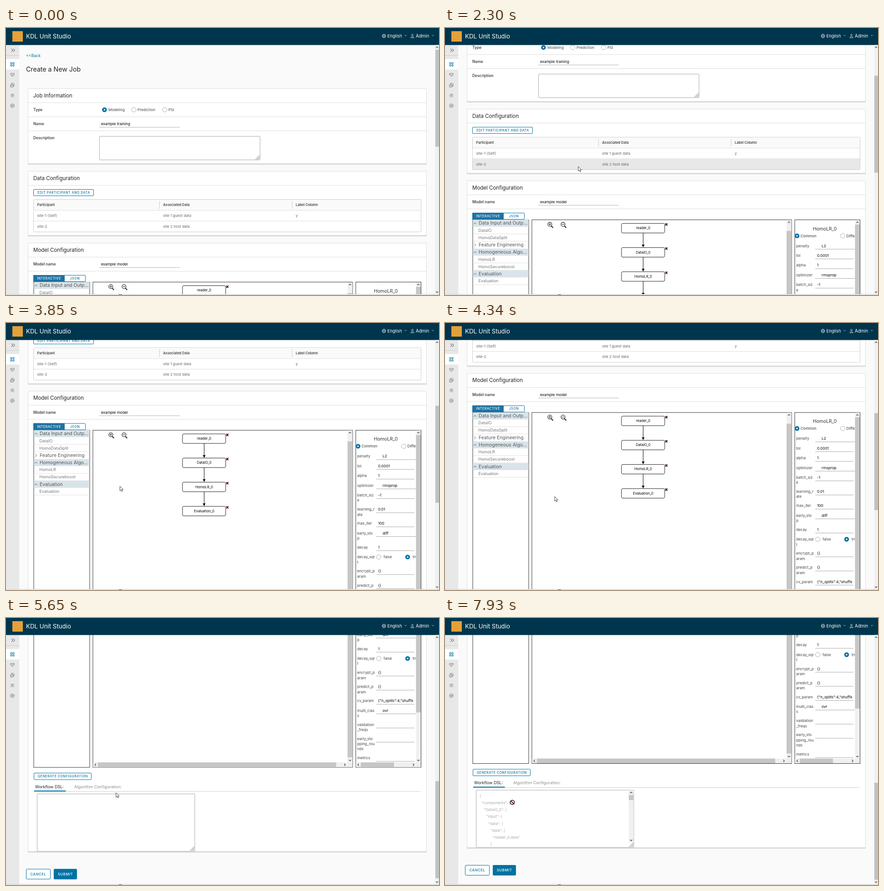
An HTML page for the animation above (8 s loop, 952 by 588 pixels).

```html
<!DOCTYPE html>
<html lang="en">
<head>
<meta charset="utf-8">
<title>Create a New Job</title>
<style>
  html, body { margin: 0; width: 100%; height: 100%; overflow: hidden; background: #fafafa; }
  svg { display: block; font-family: Inter, "Open Sans", sans-serif; }
  svg svg { overflow: hidden; }
</style>
</head>
<body>
<script>
const BLUE = '#0072a3', GREY = '#666', INK = '#222';

// Drawing helpers; y of a text is its visual middle
const rect = (x, y, w, h, fill, extra = '') =>
  `<rect x="${x}" y="${y}" width="${w}" height="${h}" fill="${fill}" ${extra}/>`;
const box = (x, y, w, h, fill, stroke, r = 0, extra = '') =>
  rect(x + .5, y + .5, w - 1, h - 1, fill, `stroke="${stroke}" rx="${r}" ${extra}`);
const path = (d, stroke, width = 1, extra = '') =>
  `<path d="${d}" fill="none" stroke="${stroke}" stroke-width="${width}" ${extra}/>`;
const hline = (x1, x2, y, color = '#dedede') => rect(x1, y, x2 - x1, 1, color);
const text = (s, x, y, size, fill = INK, extra = '') =>
  `<text x="${x}" y="${y + size * .36}" font-size="${size}" fill="${fill}" ${extra}>${s.replace(/</g, '&lt;')}</text>`;
const bold = (s, x, y, size = 8.4) => text(s, x, y, size, '#444', 'font-weight="600"');
const caps = (s, x, y, fill, size = 7) =>
  text(s, x, y, size, fill, 'font-weight="500" letter-spacing=".6" text-anchor="middle"');
const chevron = (x, y, turn, r = 2.5, color = '#444', width = 1.2) =>
  path(`M${-r} ${r / 2}L0 ${-r / 2}L${r} ${r / 2}`, color, width, `transform="translate(${x} ${y}) rotate(${turn})"`);
const radio = (x, y, on) => on
  ? `<circle cx="${x}" cy="${y}" r="5.2" fill="${BLUE}"/><circle cx="${x}" cy="${y}" r="1.7" fill="#fff"/>`
  : `<circle cx="${x}" cy="${y}" r="5" fill="#fff" stroke="#999" stroke-width=".8"/>`;
const grip = (x, y) => path(`M${x - 9} ${y}l9 -9M${x - 6} ${y}l6 -6M${x - 3} ${y}l3 -3`, '#666', .9);
const clip = (x, y, w, h, body) =>
  `<svg x="${x}" y="${y}" width="${w}" height="${h}" viewBox="${x} ${y} ${w} ${h}">${body}</svg>`;
const vbar = (x, y, w, h, from, to) => rect(x, y, w, h, '#f0f0f0') + rect(x, from, w, to - from, '#c6c6c6')
  + chevron(x + w / 2, y + 5, 0) + chevron(x + w / 2, y + h - 5, 180);
const hbar = (x, y, w, h, from, to, end) => rect(x, y, w, h, '#f0f0f0') + rect(from, y, to - from, h, '#c6c6c6')
  + chevron(x + 5, y + h / 2, -90) + chevron(end, y + h / 2, 90);
const card = (y, h, title, ...lines) => rect(48, y + 2, 877, h, '#d9d9d9', 'rx="2"')
  + box(48, y, 877, h, '#fff', '#ddd', 2) + text(title, 60, y + 15.5, 11.5)
  + lines.map(l => hline(49, 924, l)).join('');

function jobCard() {
  return text('<<Back', 44, 60.5, 8.8, BLUE) + text('Create a New Job', 44, 91, 14.2)
    + card(133, 166, 'Job Information', 164, 195, 226)
    + bold('Type', 60, 180) + bold('Name', 60, 211) + bold('Description', 60, 242)
    + radio(216.5, 180, true) + text('Modeling', 225, 180, 8.2, '#444')
    + radio(281, 180) + text('Prediction', 289, 180, 8.2, '#444')
    + radio(349, 180) + text('PSI', 357, 180, 8.2, '#444')
    + text('example training', 209, 211, 8.2, '#000') + hline(205, 382, 218, '#b3b3b3')
    + box(205, 238, 354, 53, '#fff', '#aaa', 1.5) + grip(557.5, 289.5);
}

function dataCard() {
  const rows = [['site-1 (Self)', 'site 1 guest data', 'y'], ['site-2', 'site 2 host data', '']];
  const cols = [68.5, 345.5, 637];
  return card(315, 142, 'Data Configuration', 346)
    + box(60, 355, 133, 15, '#fff', BLUE, 1.5) + caps('EDIT PARTICIPANT AND DATA', 127, 362.7, BLUE)
    + rect(60, 378, 853, 71.5, '#ccc', 'rx="2"') + box(60, 377, 853, 72, '#fff', '#ccc', 2)
    + rect(61, 378, 851, 23, '#fafafa')
    + ['Participant', 'Associated Data', 'Label Column'].map((s, i) => bold(s, cols[i], 389.7, 7.4)).join('')
    + rect(337, 381, 1, 17, '#ccc') + rect(628.5, 381, 1, 17, '#ccc')
    + rows.map((row, i) => rect(61, 402 + 23.5 * i, 851, 23, '#fff', `id="row${i}"`)
      + hline(61, 912, 401 + 23.5 * i, '#ddd')
      + row.map((s, c) => text(s, cols[c], 413.3 + 23.5 * i, 8.1, GREY)).join('')).join('');
}

function tree() {
  const rows = ['^Data Input and Outp...', 'DataIO', 'HomoDataSplit', '>Feature Engineering',
    '^Homogeneous Algo...', 'HomoLR', 'HomoSecureboost', '^Evaluation', 'Evaluation'];
  return box(60.5, 559, 124, 520, '#fff', '#333') + rows.map((s, i) => {
    const y = 566.7 + 15.95 * i, open = s[0] == '^';
    if (open || s[0] == '>')
      return (open ? rect(61.5, y - 7.5, 122, 15.5, '#d9e4ea') : '')
        + chevron(66, y + .5, open ? 0 : 90, 3, '#555', 1) + text(s.slice(1), 74, y, 10.4, '#565656');
    return text(s, 73.5, y, 9, '#777') + hline(61.5, 183.5, y + 7.5, '#e0e0e0');
  }).join('');
}

function graph() {
  const zoom = (x, sign) => `<circle cx="${x}" cy="569.5" r="4.4" fill="#fff" stroke="#333" stroke-width="1.3"/>`
    + path(`M${x + 3} 573l4 4`, '#333', 2.2) + path(sign, '#333', 1.2);
  return box(190.5, 559, 572, 520, '#fff', '#333')
    + zoom(230.5, 'M228 569.5h5M230.5 567v5') + zoom(259.5, 'M257 569.5h5')
    + ['reader_0', 'DataIO_0', 'HomoLR_0', 'Evaluation_0'].map((s, i) => {
      const y = 567 + 53.2 * i;
      return (i ? path(`M435.7 ${y - 32}v27`, '#000') + `<path d="M432.7 ${y - 6}h6l-3 6z"/>` : '')
        + box(387.5, y, 96, 22, '#fff', '#222', 3) + text(s, 435.7, y + 10.7, 7.6, '#000', 'text-anchor="middle"')
        + path(`M484.3 ${y + .3}l4.6 4.8m0 -4.8l-4.6 4.8`, '#4a0f0f', 1.9);
    }).join('')
    + vbar(751, 560, 10.5, 508, 584, 1056.5) + hbar(191.5, 1067.5, 559.5, 10.5, 202, 726, 745)
    + rect(751, 1067.5, 10.5, 10.5, '#eee');
}

function params() {
  // label lines | value; "*" marks a drop-down
  const rows = ['penalty|*L2', 'tol|0.0001', 'alpha|1', 'optimizer|*rmsprop', 'batch_siz/e|-1',
    'learning_r/ate|0.01', 'max_iter|100', 'early_sto/p|*diff', 'decay|1', 'decay_sqr/t|?',
    'encrypt_p/aram|{}', 'predict_p/aram|{}', 'cv_param|{"n_splits":4,"shuffle', 'multi_clas/s|*ovr',
    'validation/_freqs|', 'early_sto/pping_rou/nds|', 'metrics|'];
  let y = 616.7, body = text('HomoLR_0', 835, 579, 10.4, '#333', 'text-anchor="middle"')
    + radio(774, 594.7, true) + text('Common', 781.5, 594.7, 8.2, '#333')
    + radio(874.5, 594.7) + text('Different', 882.5, 594.7, 8.2, '#333');
  for (const row of rows) {
    const [label, value] = row.split('|'), lines = label.split('/'), select = value[0] == '*';
    body += lines.map((s, i) => text(s, 772, y + 11.3 * i, 8.2, '#444')).join('');
    if (value == '?')
      body += radio(819.5, y) + text('false', 830, y, 8.2, '#444') + radio(883, y, true) + text('true', 894, y, 8.2, '#444');
    else
      body += clip(815, y - 7, select ? 87 : 80, 14, text(value.replace('*', ''), select ? 828 : 818, y, 8.2, '#000'))
        + hline(814, select ? 902 : 898, y + 7, '#aaa');
    y += [21.45, 31.1, 42.4][lines.length - 1] + (label == 'cv_param' ? -.3 : 0);
  }
  return box(768.5, 559, 144.5, 520, '#fff', '#333') + clip(769.5, 560, 132, 507.5, body)
    + vbar(901.5, 560, 10.5, 508, 570, 957.5) + hbar(769.5, 1067.5, 132, 10.5, 780, 853, 896)
    + rect(901.5, 1067.5, 10.5, 10.5, '#eee');
}

function modelCard() {
  const dsl = ['{', '"components": {', '"DataIO_0": {', '"input": {', '"data": {', '"data": [', '"reader_0.data"', ']'];
  return card(473, 791, 'Model Configuration', 504, 535)
    + bold('Model name', 60, 520) + text('example model', 209, 520, 8.2, '#000') + hline(205, 382, 527, '#b3b3b3')
    + box(60, 544, 115, 15, '#fff', BLUE, 1.5) + rect(60, 544, 69, 15, '#1d72a3')
    + caps('INTERACTIVE', 94.7, 551.3, '#fff') + caps('JSON', 151.5, 551.3, BLUE)
    + tree() + graph() + params()
    + box(61, 1090.5, 127, 15.5, '#fff', BLUE, 1.5, 'id="generate"') + rect(62, 1091, 125, 2, BLUE, 'id="pressed"')
    + caps('GENERATE CONFIGURATION', 125, 1098, BLUE)
    + text('Workflow DSL:', 64, 1121, 9, '#222') + text('Algorithm Configuration:', 150, 1121, 9, '#8c8c8c')
    + hline(62, 911, 1131, '#ccc') + rect(62, 1129.5, 69.5, 2, BLUE)
    + box(68, 1136.5, 347.5, 127.5, '#fff', '#aaa', 1)
    + `<g id="dsl">${clip(69, 1137.5, 336, 125, dsl.map((s, i) =>
      text(s, 76 + 4.8 * (i == 7 ? 5 : i), 1150 + 15.15 * i, 8.2, '#aaa')).join(''))
      + vbar(404, 1137.5, 10.5, 115, 1148, 1159)}</g>` + grip(414, 1262)
    + box(44, 1302, 54, 23, '#fff', BLUE, 2) + caps('CANCEL', 71, 1313.7, BLUE, 7.7)
    + rect(105, 1302, 51, 23, BLUE, 'rx="2"') + caps('SUBMIT', 130.7, 1313.7, '#fff', 7.7);
}

function frame() {
  const icons = path('M10 76h3v3h-3zM15 76h3v3h-3zM10 81h3v3h-3zM15 81h3v3h-3z', BLUE)
    + path('M10 100h8v3l-4 4l-4 -4zM12 102l2 2l2 -2', '#777')
    + path('M12.5 121.5h3l2.5 2v4h-2M12.5 121.5v3M10 124.5h5.5v5.5h-5.5zM11.5 127h2.5', '#777')
    + path('M12.5 147a1.5 1.5 0 1 0 3 0a1.5 1.5 0 1 0 -3 0M11 152.500q3 -4.500 6 0M10 145.500h1.500M16.500 145.500h1.500M9.500 149.500l2 -1M18.500 149.500l-2 -1', '#777')
    + '<circle cx="14" cy="171" r="4" fill="none" stroke="#777" stroke-width="1.2" stroke-dasharray="2.4 .74"/>'
    + '<circle cx="14" cy="171" r="1.6" fill="none" stroke="#777"/>';
  return rect(0, 37, 29, 551, '#e8e8e8') + rect(0, 68.5, 29, 23, '#fff') + hline(0, 29, 60, '#ccc')
    + chevron(13.5, 49, 90, 3.5, '#333', 1) + chevron(17.5, 49, 90, 3.5, '#333', 1) + icons
    + rect(0, 0, 952, 37.5, '#00364d') + rect(14, 7, 23, 23, '#e5a038')
    + text('KDL Unit Studio', 44, 18.5, 13.3, '#fff')
    + path('M827 17.500a4 4 0 1 0 8 0a4 4 0 1 0 -8 0h8M831 13.500q-4 4 0 8q4 -4 0 -8', '#ddd', .8)
    + text('English', 838.5, 17.7, 9.4, '#fff') + chevron(878.5, 16.500, 180, 2, '#ddd', .9)
    + path('M891.700 15.500a1.800 1.800 0 1 0 3.600 0a1.800 1.800 0 1 0 -3.600 0M890 21.500v-1q3.500 -3.500 7 0v1z', '#ddd', .9)
    + text('Admin', 901, 17.7, 9.7, '#fff') + chevron(938.500, 16.500, 180, 2, '#ddd', .9)
    + vbar(943.5, 37.5, 8.5, 549, 0, 0) + rect(944, 48, 8, 213.5, '#c1c1c1', 'id="thumb"')
    + hline(0, 952, 586, '#ccc') + rect(0, 587, 952, 1, '#f4f4f4') + rect(248, 586.5, 7, 1.5, '#888');
}

const pointers = '<path id="arrow" d="M0 0V10.200L2.400 8L4.100 11.700L5.700 11L4 7.400H7.200Z" fill="#fff" stroke="#333" stroke-width=".9"/>'
  + path('M-2 -5.500h1.500l.5 .5l.5 -.5h1.500M0 -5v10M-2 5.500h1.500l.5 -.5l.5 .5h1.500', '#333', 1, 'id="beam"')
  + '<g id="banned" fill="none" stroke="#3d0b0b" stroke-width="1.7"><circle r="4.600" fill="#fff"/><path d="M-3.200 -3.200L3.200 3.200"/></g>';

document.body.innerHTML = `<svg width="952" height="588" viewBox="0 0 952 588">`
  + rect(0, 0, 952, 588, '#fafafa')
  + clip(29, 37, 915, 549, `<g id="page">${jobCard() + dataCard() + modelCard()}</g>`)
  + frame() + `<g id="pointer">${pointers}</g></svg>`;

const el = id => document.getElementById(id);
const show = (id, on) => el(id).setAttribute('visibility', on ? 'visible' : 'hidden');
const move = (id, x, y) => el(id).setAttribute('transform', `translate(${x} ${y})`);

// Keys are [time, ...values], joined by straight lines
const scrollKeys = [[1780, 0], [2300, 137], [2580, 171], [3070, 238.5], [3430, 290], [4340, 362],
  [4760, 520], [5060, 520], [5650, 749.5], [5860, 758]];
const pointerKeys = [[130, 300, 588], [520, 290, 400], [900, 243, 213], [1040, 242, 206], [1180, 250, 220],
  [1530, 297, 282], [1740, 293, 305], [2580, 293, 305], [3070, 268, 317], [4270, 241, 382],
  [5860, 242, 385], [6710, 140, 342], [7510, 140, 342], [7930, 148, 406]];

function at(keys, t) {
  const next = keys.findIndex(k => k[0] > t);
  if (next == 0) return keys[0].slice(1);
  if (next < 0) return keys[keys.length - 1].slice(1);
  const a = keys[next - 1], b = keys[next], p = (t - a[0]) / (b[0] - a[0]);
  return a.slice(1).map((v, i) => v + (b[i + 1] - v) * p);
}

function render(now) {
  const t = now % 8000;
  const [scroll] = at(scrollKeys, t), [x, y] = at(pointerKeys, t);
  const over = (x1, y1, x2, y2) => t >= 130 && x > x1 && x < x2 && y + scroll > y1 && y + scroll < y2;
  move('page', 0, -scroll);
  move('thumb', 0, scroll * .4155);
  move('pointer', x, y);

  const banned = over(68, 1137, 415, 1263);
  const beam = over(205, 203, 382, 219) || over(205, 238, 559, 291) || over(205, 511, 382, 528);
  show('banned', banned);
  show('beam', beam);
  show('arrow', t >= 130 && !banned && !beam);

  for (const i of [0, 1])
    el('row' + i).setAttribute('fill', over(61, 402 + 23.5 * i, 912, 425 + 23.5 * i) ? '#e8e8e8' : '#fff');
  el('generate').setAttribute('fill', over(61, 1090, 188, 1106) ? '#e1f1f6' : '#fff');
  show('pressed', t >= 6780 && t < 7510);
  show('dsl', t >= 7510);
  requestAnimationFrame(() => render(performance.now()));
}
render(performance.now());
</script>
</body>
</html>
```
